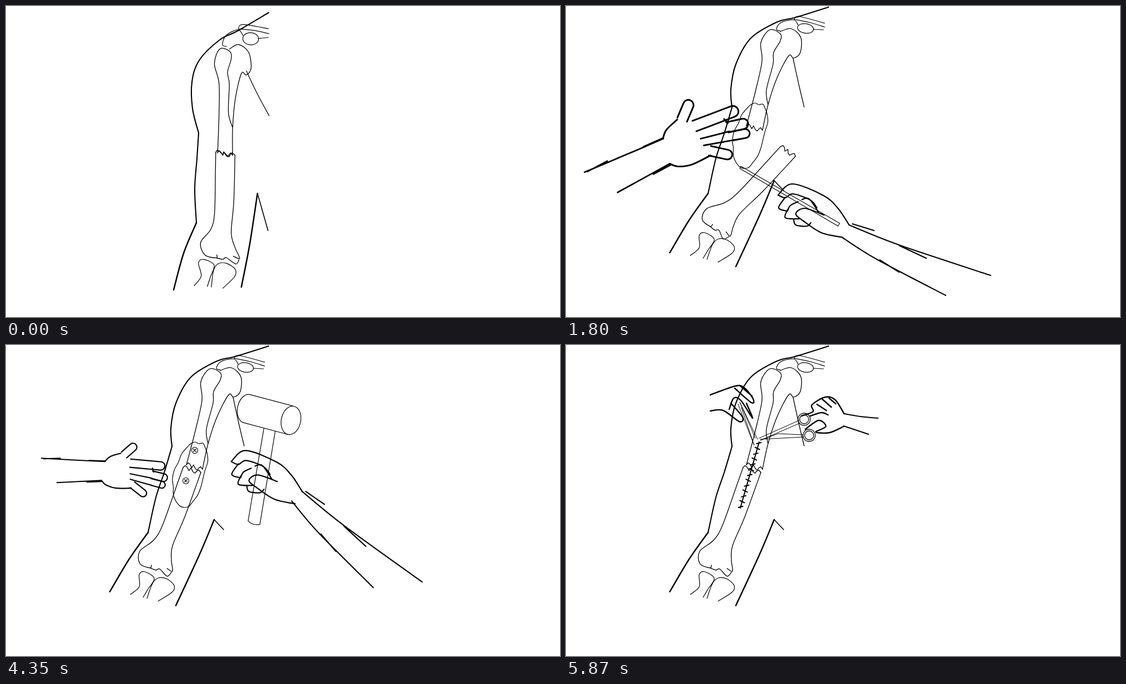
Animation, 998 px wide and 561 px high, one loop 6040 ms. Source, as an HTML page:

```html
<!DOCTYPE html>
<html lang="en">
<head>
<meta charset="utf-8">
<title>Fracture repair</title>
<style>
html, body { margin: 0; width: 100%; height: 100%; overflow: hidden; background: #fff; }
svg { display: block; width: 998px; height: 561px; }
path { fill: none; stroke: #000; stroke-linecap: round; stroke-linejoin: round; }
.bone path { vector-effect: non-scaling-stroke; }
</style>
</head>
<body>
<svg id="stage" viewBox="0 0 998 561"></svg>
<script>
const LOOP = 6040;
const stage = document.getElementById('stage');

function make(tag, parent, attrs = {}) {
  const el = document.createElementNS('http://www.w3.org/2000/svg', tag);
  for (const name in attrs) el.setAttribute(name, attrs[name]);
  parent.appendChild(el);
  return el;
}
const group = (parent = stage, name = '') => make('g', parent, { class: name });
const show = (el, on) => el.setAttribute('display', on ? 'inline' : 'none');
const place = (el, value) => el.setAttribute('transform', value);

const clamp = k => Math.max(0, Math.min(1, k));
const lerp = (a, b, k) => a + (b - a) * k;
const mix = (p, q, k) => p.map((v, i) => lerp(v, q[i], k));
const mixAll = (a, b, k) => a.map((p, i) => mix(p, b[i], k));
const points = text => text.trim().split(/\s+/).map(p => p.split(',').map(Number));

function seeded(seed) {
  return () => (seed = seed * 16807 % 2147483647) / 2147483647 - 0.5;
}

// Smooth pen line through key points.
function curve(p) {
  let d = 'M' + p[0];
  for (let i = 0; i < p.length - 1; i++) {
    const a = p[i - 1] || p[i], b = p[i], c = p[i + 1], e = p[i + 2] || c;
    d += `C${b[0] + (c[0] - a[0]) / 6},${b[1] + (c[1] - a[1]) / 6} ` +
         `${c[0] - (e[0] - b[0]) / 6},${c[1] - (e[1] - b[1]) / 6} ${c}`;
  }
  return d;
}
const raw = (parent, width, d) => make('path', parent, { d, 'stroke-width': width });
const draw = (parent, width, ...lines) => raw(parent, width, lines.map(l => curve(points(l))).join(''));

function oval(parent, width, cx, cy, rx, ry, tilt = 0, wobble = 0) {
  const random = seeded(71), n = 24;
  const ring = Array.from({ length: n }, (_, i) => {
    const angle = i / n * 2 * Math.PI, r = 1 + wobble * random();
    const x = rx * r * Math.cos(angle), y = ry * r * Math.sin(angle);
    return [cx + x * Math.cos(tilt) - y * Math.sin(tilt), cy + x * Math.sin(tilt) + y * Math.cos(tilt)];
  });
  return raw(parent, width, curve([...ring, ring[0]]));
}

// Two sides and a round tip.
function finger(parent, width, x0, y0, x1, y1, thick) {
  const k = thick / 2 / Math.hypot(x1 - x0, y1 - y0), nx = (y1 - y0) * k, ny = (x0 - x1) * k, r = thick / 2;
  raw(parent, width, `M${x0 + nx} ${y0 + ny}L${x1 + nx} ${y1 + ny}A${r} ${r} 0 0 1 ${x1 - nx} ${y1 - ny}L${x0 - nx} ${y0 - ny}`);
}

function crack(parent, from, to) {
  const random = seeded(9), n = 9;
  const jag = Array.from({ length: n + 1 }, (_, i) => {
    const [x, y] = mix(from, to, i / n);
    return [x, y + (i % n ? 9 * random() : 0)];
  });
  raw(parent, 1.3, 'M' + jag.join('L'));
}

// Matrix that carries three anchors to three others.
function carry(from, to) {
  const side = (p, i, axis) => p[i][axis] - p[0][axis];
  const det = side(from, 1, 0) * side(from, 2, 1) - side(from, 2, 0) * side(from, 1, 1);
  const rows = [0, 1].map(axis => {
    const x = (side(to, 1, axis) * side(from, 2, 1) - side(to, 2, axis) * side(from, 1, 1)) / det;
    const y = (side(to, 2, axis) * side(from, 1, 0) - side(to, 1, axis) * side(from, 2, 0)) / det;
    return [x, y, to[0][axis] - x * from[0][0] - y * from[0][1]];
  });
  return `matrix(${[0, 1, 2].map(i => [rows[0][i], rows[1][i]])})`;
}

function track(rows, t) {
  const next = rows.findIndex(r => r[0] > t);
  if (next <= 0) return rows[next ? rows.length - 1 : 0].slice(1);
  const a = rows[next - 1], b = rows[next];
  return mix(a, b, (t - a[0]) / (b[0] - a[0])).slice(1);
}

// Skin lines: straight pose, bent pose
const skin = [
  [2.1, '473,12 417,45 385,61 348,98 335,137 336,185 347,229', '473,2 412,21 380,29 333,58 306,105 297,150 299,183'],
  [2.1, '347,229 344,275 340,330 343,391', '299,183 285,230 270,275 256,338'],
  [2.5, '343,391 320,446 302,512', '256,338 222,386 187,445'],
  [2.5, '453,338 439,430 424,507', '375,315 349,377 306,470'],
  [1.3, '433,117 452,157 474,198', '409,94 419,140 429,182'],
].map(([width, ...poses]) => ({ el: raw(stage, width, ''), poses: poses.map(points) }));
const flank = raw(stage, 1.6, '');

// Bones: anchors per pose, the last one is the pose they are drawn in
function bone(...poses) {
  return { el: group(stage, 'bone'), poses: poses.map(points) };
}
const shoulder = bone('390,70 473,41 450,66', '379,42 466,31 440,47');
draw(shoulder.el, 1.2, '386,45 379,42 387,30 410,25 418,34', '411,24 420,19 466,31', '411,24 440,30 466,38', '445,42 464,43');
oval(shoulder.el, 1.2, 431.5, 40.5, 14.5, 8.5, 0.15);

const upper = bone('388,78 395,266 441,95', '370,44 340,219 425,68');
draw(upper.el, 1.3, '325,216 341,155 353,100 351,66 367,43 386,50 386,63 374,84 373,105 361,152 364,178',
  '386,46 406,41 423,57 422,84 410,94 401,90 380,130 364,178 354,224');
crack(upper.el, [325, 216], [354, 224]);

const lower = bone('395,266 352,440 421,455', '400,262 246,376 296,415', '335,225 238,385 300,408');
draw(lower.el, 1.3, '319,221 307,255 282,325 266,352 241,372 241,394 259,402 262,397',
  '351,230 322,310 300,362 298,388 300,408 290,403', '259,402 270,406 277,404 290,417 298,410');
crack(lower.el, [319, 221], [351, 230]);

const forearmBones = bone('347,465 413,475 370,507', '240,415 303,434 254,457');
draw(forearmBones.el, 1.2, '224,450 240,436 240,414 250,409 267,421 256,440 247,455',
  '254,457 264,430 275,420 290,422 303,434 299,446 274,462');

// Wound, cut and seam
const TOP = [348, 175], BOTTOM = [314, 294];
const wound = oval(stage, 1.2, 331, 234, 27, 61, 0.28, 0.16);
const cut = raw(stage, 1.2, '');
const seam = group();
const thread = raw(seam, 2, '');
const stitches = Array.from({ length: 13 }, (_, i) => {
  const at = (i + 0.2) / 12.4, [x, y] = mix(BOTTOM, TOP, at), tilt = i % 2 ? 2 : -1;
  return { at, el: raw(seam, 2, `M${x - 4},${y - tilt}L${x + 4},${y + tilt}`) };
});

const screws = [0, 1].map(() => {
  const el = group();
  oval(el, 1.1, 0, 0, 5.5, 5.5);
  raw(el, 1.3, 'M-2.3-2.3L2.3 2.3M2.3-2.3L-2.3 2.3');
  return el;
});

// Open left hand
const openHand = group();
finger(openHand, 2.2, 175, 200, 191, 186, 14);
finger(openHand, 2.2, 186, 215, 241, 220, 15);
finger(openHand, 2.2, 225, 236, 246, 241, 14);
finger(openHand, 2.2, 225, 249, 243, 254, 12);
finger(openHand, 2.2, 190, 254, 209, 269, 13);
draw(openHand, 2.2, '141,211 150,203 169,197', '186,234 225,242', '186,244 225,255', '188,260 160,260 142,254 134,246', '226,224 228,231');
draw(openHand, 2, '26,206 80,209 141,212', '30,207 60,206', '112,210 141,211', '54,250 134,246', '108,249 134,248');

// Right hand with scalpel
const scalpel = group();
raw(scalpel, 1.6, 'M571 227Q552 254 574 302L583 357M571 227Q580 242 586 307L594 356M570 247Q564 256 577 300Q584 303 580 280Q574 249 570 247M580 338L591 331M593 435V449Q601 458 609 447V436');
finger(scalpel, 2.5, 588, 366, 558, 374, 16);
for (let i = 0; i < 3; i++) finger(scalpel, 2.5, 602, 388 + 18 * i, 567 + 3 * i, 388 + 17 * i, 16);
draw(scalpel, 2.5, '593,376 597,366 596,354 609,350 609,371 634,396 637,443', '563,412 570,434 587,455 609,464', '612,453 620,447',
  '637,443 707,513 850,655', '608,464 625,500 672,561 740,640');

// Right arm with rod or mallet
const mallet = group();
raw(mallet, 1.2, 'M467 234L385 229A17 26 0 0 0 385 281L467 286M422 284L427 453Q437 460 449 455L443 285');
oval(mallet, 1.2, 467, 260, 17.5, 26);
const arm = group();
draw(arm, 2.2, '382,341 408,321 464,342 490,365 510,395', '382,341 395,346 409,339 440,350 452,364', '395,345 383,364 398,370',
  '399,370 404,360 418,353', '400,366 395,382 420,384', '410,384 414,395 434,397 441,391',
  '465,377 430,365 414,375 428,388 460,409 497,417', '425,349 438,348 455,372');
const rod = raw(arm, 1.1, 'M315 289L493 392L490 397L313 293Z');
const forearm = group(arm);
draw(forearm, 2.1, '510,395 600,431 765,486', '516,393 555,405', '600,432 649,455', '497,417 560,457 684,522', '565,458 600,480');

// Hands that sew
const sewing = group();
draw(sewing, 2.4, '260,90 305,74 321,77 337,97 334,104 304,78', '313,73 335,92', '260,119 283,118 312,138 318,130 297,105',
  '294,116 302,96 315,100 336,132 325,105');
raw(sewing, 1, 'M310 107L339 181L316 113M345 170L313 103L341 168M348 168L420 136M421 141L350 172L382 160L427 162M428 166L350 170');
for (const r of [11, 8]) {
  oval(sewing, 1.3, 429, 134, r, r);
  oval(sewing, 1.3, 438, 163, r, r);
}
draw(sewing, 2.4, '424,128 445,120 443,108 467,94 485,99 501,124', '440,128 460,122 472,126', '452,107 469,118', '462,98 478,112',
  '474,96 486,106', '431,152 455,136 468,147 450,157 475,158 500,147');
draw(sewing, 2, '501,124 530,129 562,132', '500,146 545,161');

// The picture holds still between these moments.
const run = (from, to, gap) => Array.from({ length: Math.floor((to - from) / gap) + 1 }, (_, i) => from + i * gap);
const moments = [...run(0, 560, 80), ...run(880, 1560, 170), ...run(1630, 2990, 170), ...run(3160, 3840, 170),
  ...run(4180, 4520, 170), ...run(4680, 5870, 170)];

const openKeys = [ // time, x, y, turn, size
  [880, 40, 468, -56.5, 1.57], [1800, 180, 261, -26, 1.34], [2650, 137, 228, 0, 1], [2990, 20, 205, 0, 1],
  [3500, 240, 246, 0, 1], [4180, 240, 246, 0, 1], [4850, -17, 168, 0, 1], [5190, -60, 155, 0, 1],
];
const scalpelKeys = [[880, 0, 0, 0], [1050, -223, -51, -25], [1390, -257, 66, -25]];
const awayKeys = [[1560, 0.8], [1800, 0], [2650, 0], [2990, 1], [3160, 1], [3500, 0], [4850, 0], [5190, 0.5]];

function render(time) {
  const t = moments.filter(m => m <= time).pop();
  const within = (from, to) => t >= from && t < to;
  const bend = clamp(t / 560), set = clamp((t - 1800) / 680);

  for (const { el, poses } of skin) el.setAttribute('d', curve(mixAll(poses[0], poses[1], bend)));
  const armpit = mix([453, 338], [375, 315], bend);
  flank.setAttribute('d', `M${armpit}L${t < 1050 ? [472, 405] : [392, 333]}`);

  for (const { el, poses } of [shoulder, upper, lower, forearmBones]) {
    const bent = mixAll(poses[0], poses[1], bend);
    place(el, carry(poses[poses.length - 1], poses[2] ? mixAll(bent, poses[2], set) : bent));
  }

  show(cut, within(1220, 1630));
  cut.setAttribute('d', `M${TOP}L${mix(TOP, BOTTOM, clamp((t - 1050) / 340))}`);
  show(wound, within(1630, 5360));

  show(openHand, within(880, 5360));
  const [hx, hy, turn, size] = track(openKeys, t);
  place(openHand, `translate(${hx} ${hy}) rotate(${turn}) scale(${size}) translate(-137 -228)`);

  show(scalpel, within(880, 1560));
  const [sx, sy, tilt] = track(scalpelKeys, t);
  place(scalpel, `translate(${sx} ${sy}) rotate(${tilt} 571 227)`);

  const [away] = track(awayKeys, t);
  const lift = t < 3500 ? 0 : Math.sin(Math.PI * (t - 3500) / 540) ** 2;
  const x = 72 * away + 25 * lift, y = 130 * away - 138 * lift;
  show(arm, within(1560, 5360));
  show(rod, t < 3160);
  show(mallet, within(3160, 5360));
  place(arm, `translate(${x} ${y})`);
  place(forearm, `rotate(${18.4 * lift} 510 395)`);
  place(mallet, `translate(${x + 24 * lift} ${y + 7 * lift}) rotate(${12 * lift} 467 260)`);

  const driven = Math.min(1, (t - 3500) / 340);
  screws.forEach((el, i) => {
    show(el, within(3160, 5360));
    place(el, `translate(${mix([190 + 17 * i, 207 + i], [340 - 16 * i, 190 + 55 * i], driven)})`);
  });

  const sewn = clamp((t - 5190) / 680), needle = mix(BOTTOM, TOP, sewn);
  show(seam, t >= 5360);
  show(sewing, t >= 5360);
  thread.setAttribute('d', `M${BOTTOM}L${needle}`);
  stitches.forEach(({ at, el }) => show(el, at <= sewn));
  place(sewing, `translate(${needle[0] - TOP[0]} ${needle[1] - TOP[1]})`);
}

const start = performance.now();
function tick() {
  render((performance.now() - start) % LOOP);
  requestAnimationFrame(tick);
}
tick();
</script>
</body>
</html>
```
